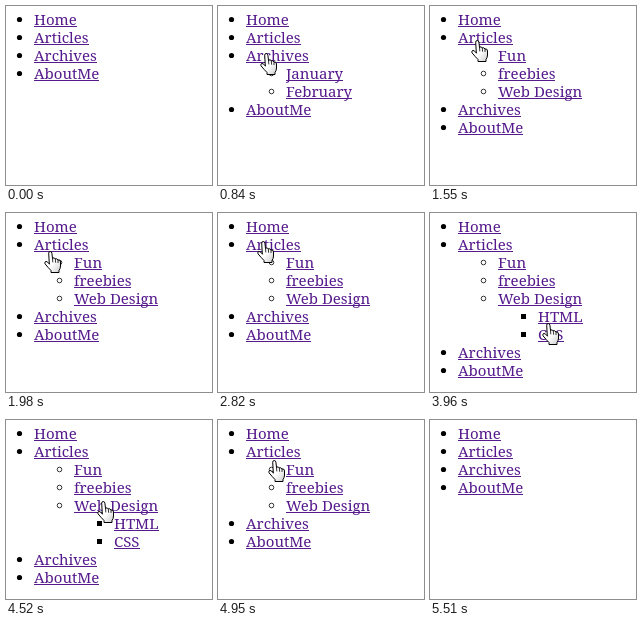
An HTML page that plays this animation: 206x179 px, repeating every 5750 ms.

```html
<!DOCTYPE html>
<html lang="en">
<head>
<meta charset="utf-8">
<title>Nested menu</title>
<style>
  html, body { margin: 0; width: 100%; height: 100%; overflow: hidden; background: #fff; }
  svg { display: block; width: 100vw; height: 100vh; }
  text { font: 15px "Noto Serif", "Liberation Serif", serif; fill: #551a8b; }
  .line { fill: #551a8b; }
  .ring { fill: #fff; stroke: #333; }
</style>
</head>
<body>
<svg viewBox="0 0 206 179">
  <defs>
    <linearGradient id="shade" x2="1" y2="1">
      <stop offset=".55" stop-color="#fff"/>
      <stop offset="1" stop-color="#ccc"/>
    </linearGradient>
  </defs>
  <g id="menu"></g>
  <g id="hand" stroke="#000" stroke-linejoin="round" stroke-linecap="round">
    <path fill="url(#shade)" d="M5.3 12.8L4.7 2.2Q4.7 .5 6.2 .5Q7.7 .5 7.9 2.2L8.5 7.3Q10.5 6 11.3 8Q13 7 14 9Q16.5 8.5 16.5 11V15Q16.5 17.5 15 19.5V21.5H7V19.5Q4 16.5 1 12.8Q.3 10.7 2 10.4Q3.6 10.5 5.3 12.8Z"/>
    <path fill="none" stroke-width=".8" d="M8.5 7.3L8.8 11M11.3 8L11.6 11.3M14 9V11.6"/>
  </g>
</svg>
<script>
const LOOP = 5750;
const TICK = 141.2; // the picture only changes on these steps
const ROW = 18;
const INDENT = 40;
const NS = "http://www.w3.org/2000/svg";

// open: first tick with the submenu shown, first tick without it
const MENU = [
  { name: "Home" },
  { name: "Articles", open: [10, 36], items: [
    { name: "Fun" },
    { name: "freebies" },
    { name: "Web Design", open: [26, 33], items: [{ name: "HTML" }, { name: "CSS" }] }
  ] },
  { name: "Archives", open: [3, 9], items: [{ name: "January" }, { name: "February" }] },
  { name: "AboutMe" }
];

// Key points of the pointer: tick and fingertip
const PATH = [
  { tick: 1, x: 72, y: 58 },
  { tick: 6, x: 48, y: 47 },
  { tick: 9, x: 48, y: 32 },
  { tick: 14, x: 44, y: 38 },
  { tick: 20, x: 45, y: 28 },
  { tick: 25, x: 97, y: 78 },
  { tick: 29, x: 122, y: 116 },
  { tick: 32, x: 97, y: 81 },
  { tick: 36, x: 48, y: 32 },
  { tick: 39, x: 76, y: 50 }
];

const menu = document.getElementById("menu");
const hand = document.getElementById("hand");

function add(parent, tag, attrs) {
  const el = document.createElementNS(NS, tag);
  for (const key in attrs) el.setAttribute(key, attrs[key]);
  return parent.appendChild(el);
}

function addBullet(row, level, x) {
  const cy = 13.5;
  if (level === 0) add(row, "circle", { cx: x, cy, r: 2.6 });
  if (level === 1) add(row, "circle", { cx: x, cy, r: 2.3, class: "ring" });
  if (level === 2) add(row, "rect", { x: x - 2.5, y: cy - 2.5, width: 5, height: 5 });
}

function build(items, level = 0) {
  for (const item of items) {
    const x = 28 + level * INDENT;
    item.row = add(menu, "g", {});
    addBullet(item.row, level, x - 14.5);
    const label = add(item.row, "text", { x, y: 19 });
    label.textContent = item.name;
    const width = Math.round(label.getComputedTextLength());
    add(item.row, "rect", { x, y: 20, width, height: 1, class: "line" });
    if (item.items) build(item.items, level + 1);
  }
}

const within = ([from, to], tick) => tick >= from && tick < to;

function layout(items, tick, shown = true, index = 0) {
  for (const item of items) {
    item.row.setAttribute("visibility", shown ? "visible" : "hidden");
    if (shown) item.row.setAttribute("transform", `translate(0 ${index++ * ROW})`);
    if (item.items) index = layout(item.items, tick, shown && within(item.open, tick), index);
  }
  return index;
}

function movePointer(tick) {
  const next = PATH.findIndex(p => p.tick > tick);
  hand.setAttribute("visibility", next > 0 ? "visible" : "hidden");
  if (next <= 0) return;
  const a = PATH[next - 1], b = PATH[next];
  const u = (tick - a.tick) / (b.tick - a.tick);
  const k = u * u * (3 - 2 * u);
  const mix = axis => Math.round(a[axis] + (b[axis] - a[axis]) * k);
  hand.setAttribute("transform", `translate(${mix("x") - 6} ${mix("y")})`);
}

function render(t) {
  const tick = Math.floor((t + 8) / TICK);
  layout(MENU, tick);
  movePointer(tick);
}

build(MENU);
render(0);
const start = performance.now();
function frame() {
  render((performance.now() - start) % LOOP);
  requestAnimationFrame(frame);
}
requestAnimationFrame(frame);
</script>
</body>
</html>
```
